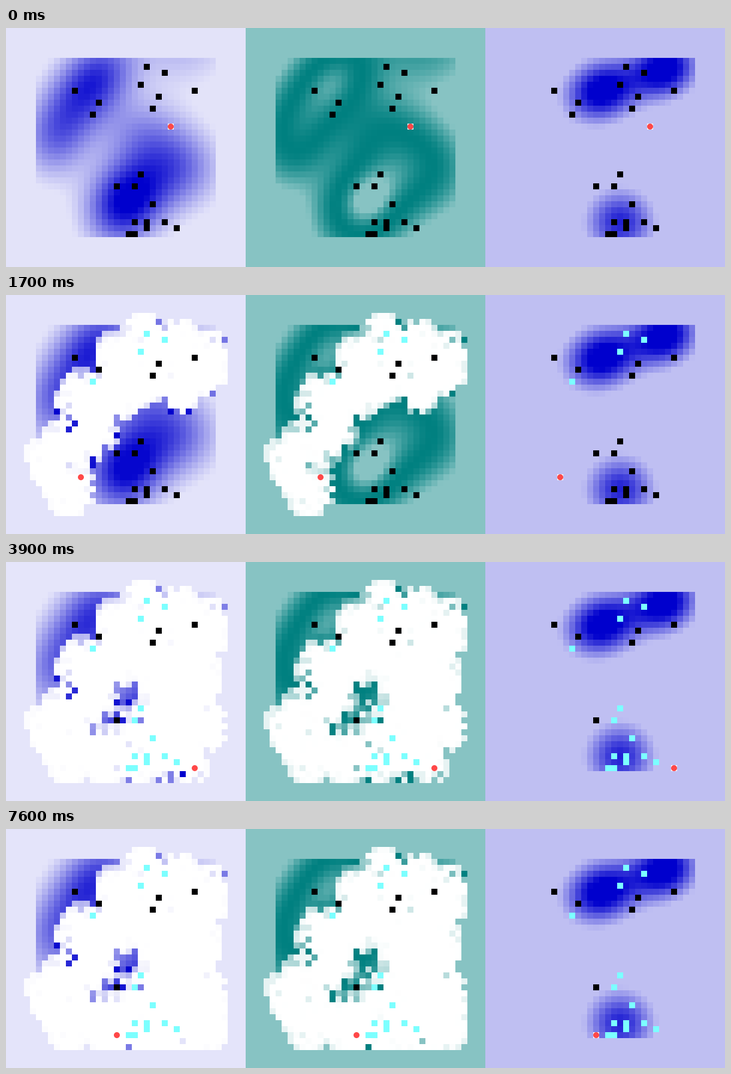
Animation of 1200x400 px, one loop 7700 ms. Source, as a matplotlib script:

```python
import matplotlib.pyplot as plt
import numpy as np
from matplotlib.animation import FuncAnimation
from matplotlib.patches import Circle

N, CELL = 40, 10
FRAMES, INTERVAL = 77, 100
SUBSTEPS = 16
LOW, HIGH = 5, 34  # cells the searcher may enter
SENSOR_ERROR, EVIDENCE = 0.1, np.log(9)
BLUE, TEAL, CYAN, RED = (0, 0, 205), (0, 128, 128), (124, 255, 255), "#ff4848"

yy, xx = np.mgrid[0:N, 0:N]
inside = (xx >= LOW) & (xx <= HIGH) & (yy >= LOW) & (yy <= HIGH)


def blob(cx, cy, amp, along, across, angle=0):
    """Tilted Gaussian; the angle turns the long axis upward from the right."""
    a = np.radians(angle)
    u = (xx - cx) * np.cos(a) - (yy - cy) * np.sin(a)
    v = (xx - cx) * np.sin(a) + (yy - cy) * np.cos(a)
    return amp * np.exp(-0.5 * ((u / along) ** 2 + (v / across) ** 2))


def field(base, top, *blobs):
    return np.where(inside, np.clip(sum(blobs), base, top), base)


PRIOR = field(
    0.1, 0.9,
    blob(14, 8.5, 0.75, 5.5, 3.9, 50),
    blob(8, 17.5, 0.5, 5, 4, 75),
    blob(19.5, 28.7, 0.92, 5, 4.2, 55),
    blob(28, 23, 0.5, 5, 4.8),
    blob(22, 17, 0.32, 5, 4.5),
    blob(29, 3, 0.24, 6, 4.5),
)
TRUTH = field(
    0.25, 1,
    blob(19, 10, 1.15, 4.4, 3.5, 20),
    blob(29.5, 6.3, 1.15, 3.8, 3.3, 25),
    blob(22, 32, 0.87, 4, 3.9),
)

MISSED = [(11, 10), (31, 10), (25, 11), (15, 12), (24, 13), (18, 26)]
FINDABLE = [(23, 6), (26, 7), (22, 9), (14, 14), (22, 24), (21, 26), (24, 29),
            (21, 32), (23, 32), (23, 33), (26, 32), (28, 33), (20, 34), (21, 34)]

track = [(27, 16)]


def go(frames, x, y, sway=0, swings=0):
    """Move to a cell at even speed, weaving sideways on the way."""
    start, end = np.array(track[-1], float), np.array((x, y), float)
    way = end - start
    normal = np.array((-way[1], way[0])) / np.hypot(*way)
    for u in np.arange(1, frames * SUBSTEPS + 1) / (frames * SUBSTEPS):
        spot = start + way * u + normal * sway * np.sin(np.pi * swings * u)
        track.append(tuple(np.clip(np.rint(spot), LOW, HIGH).astype(int)))


# upper right, then the left lobe
go(1, 34, 13)
go(7, 17, 8, 5, 6)
go(1, 22, 16)
go(2, 11, 16, 2, 5)
go(1, 16, 23, 2, 3)
# lower left
go(3, 5, 26, 2, 4)
go(1, 9, 33)
go(4, 22, 31, 3, 5)
go(1, 21, 25)
go(1, 28, 26, 2, 2)
# right edge and middle
go(2, 33, 29)
go(2, 33, 21, 1, 2)
go(6, 24, 20, 4, 5)
go(1, 25, 25)
# lower right
go(2, 25, 31)
go(6, 34, 31, 3, 4)
go(1, 34, 34)
go(5, 24, 34)
go(1, 19, 33)
# stuck between two cells
for f in range(len(track) // SUBSTEPS, FRAMES):
    track += [(18, 34 if f % 2 else 31)] * SUBSTEPS


def survey():
    """Belief and seen cells at the start of every frame."""
    rng = np.random.default_rng(7)
    odds = np.log(PRIOR / (1 - PRIOR))
    seen = np.zeros((N, N), bool)
    states, last = [], None
    for step in range(FRAMES * SUBSTEPS):
        if step % SUBSTEPS == 0:
            states.append((1 / (1 + np.exp(-odds)), seen.copy()))
        if track[step] == last:
            continue
        last = x, y = track[step]
        near = (xx - x) ** 2 + (yy - y) ** 2 <= 5
        wrong = rng.random((N, N)) < SENSOR_ERROR
        odds = odds + near * np.where(wrong, EVIDENCE, -EVIDENCE)
        seen |= near
    return states


STATES = survey()


def entropy(p):
    q = np.clip(p, 1e-9, 1 - 1e-9)
    return -(q * np.log2(q) + (1 - q) * np.log2(1 - q))


def tint(alpha, color):
    alpha = alpha[..., None]
    return 255 * (1 - alpha) + np.array(color) * alpha


def picture(f):
    p, seen = STATES[f]
    panels = [tint(p / p.max(), BLUE), tint(entropy(p), TEAL), tint(TRUTH, BLUE)]
    col, row = track[f * SUBSTEPS]
    for panel in panels:
        for x, y in MISSED:
            panel[y, x] = 0
        for x, y in FINDABLE:
            panel[y, x] = CYAN if seen[y, x] else 0
        panel[row, col] = 255
    return np.hstack(panels).round().astype(np.uint8)


fig = plt.figure(figsize=(12, 4), dpi=100)
ax = fig.add_axes([0, 0, 1, 1])
ax.axis("off")
image = ax.imshow(picture(0), extent=(0, 3 * N * CELL, N * CELL, 0),
                  interpolation="nearest", aspect="auto")
dots = [ax.add_patch(Circle((0, 0), 5, color=RED, lw=0)) for _ in range(3)]
ax.set(xlim=(0, 3 * N * CELL), ylim=(N * CELL, 0))


def update(f):
    image.set_data(picture(f))
    x, y = track[f * SUBSTEPS]
    for i, dot in enumerate(dots):
        dot.center = ((i * N + x + 0.5) * CELL, (y + 0.5) * CELL)
    return [image, *dots]


anim = FuncAnimation(fig, update, frames=FRAMES, interval=INTERVAL,
                     repeat=True, repeat_delay=0)
plt.show()
```
